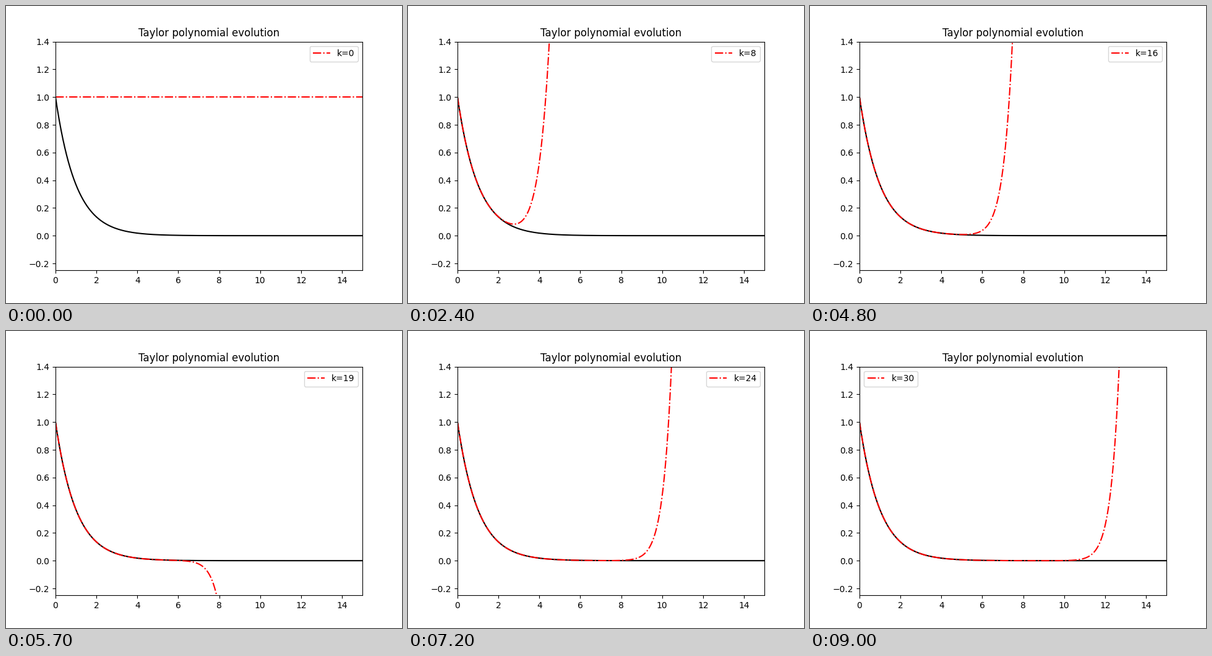
A matplotlib script for the animation above (9.3 s loop, 640 by 480 pixels).

```python
import math

import matplotlib.pyplot as plt
import numpy as np
from matplotlib.animation import FuncAnimation

ORDERS = 31
STEP_MS = 300

x = np.linspace(0, 15, 1000)


def taylor(k):
    """Taylor polynomial of exp(-x) around 0, up to degree k."""
    return sum((-x) ** n / math.factorial(n) for n in range(k + 1))


fig, ax = plt.subplots(figsize=(6.4, 4.8), dpi=100)
ax.set_title("Taylor polynomial evolution")
ax.set_xlim(0, 15)
ax.set_ylim(-0.25, 1.4)
ax.plot(x, np.exp(-x), color="black")
approx, = ax.plot([], [], color="red", linestyle="-.")


def update(k):
    approx.set_data(x, taylor(k))
    # The last curve runs through the upper right corner.
    loc = "upper left" if k == ORDERS - 1 else "upper right"
    ax.legend([approx], [f"k={k}"], loc=loc)
    return approx,


anim = FuncAnimation(fig, update, frames=ORDERS, init_func=lambda: (approx,),
                     interval=STEP_MS, repeat=True, repeat_delay=0)
plt.show()
```
